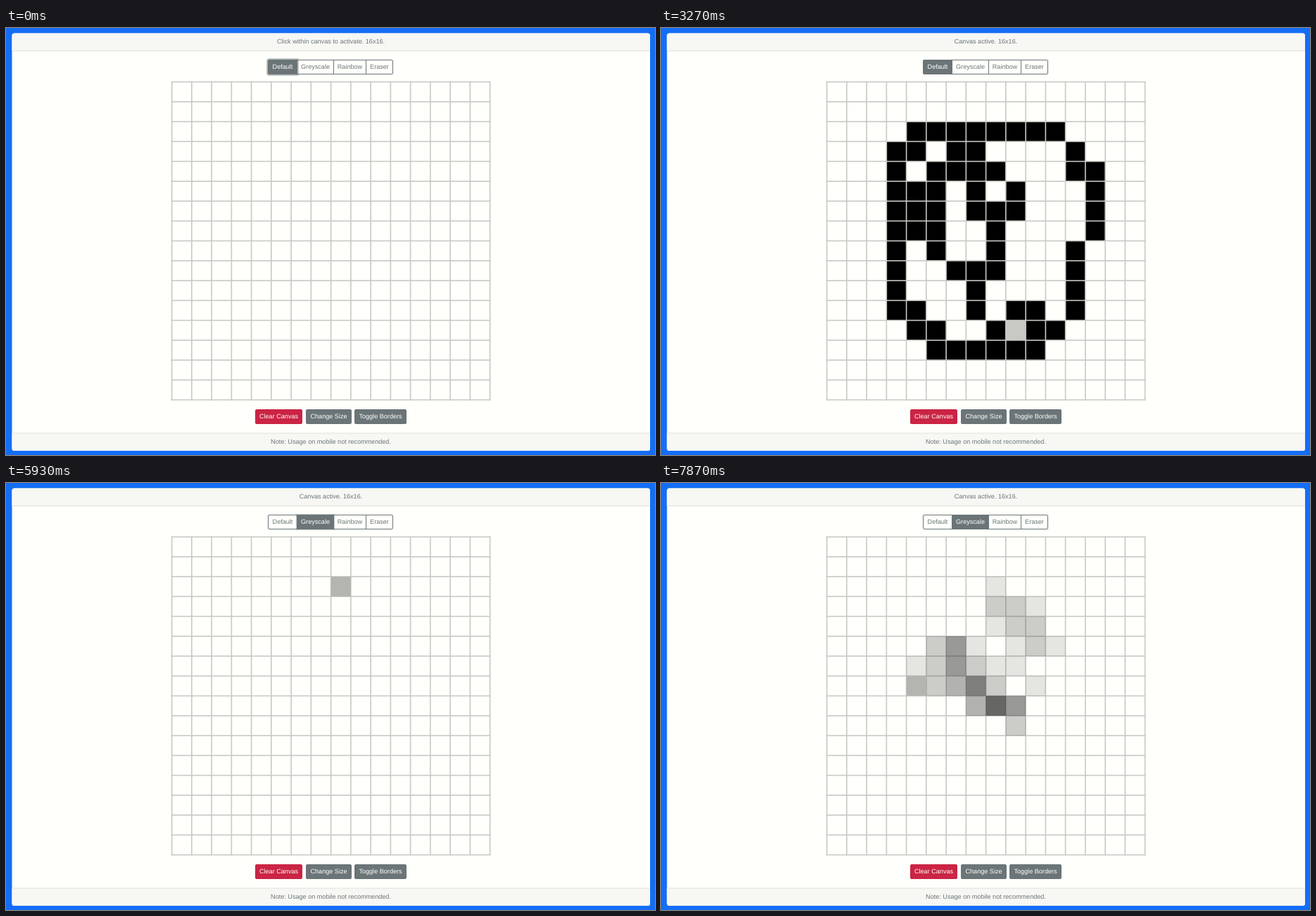
Recreate the animation shown at these times as an HTML page with a canvas. Size 922 by 607 pixels, loop 8 s.

```html
<!DOCTYPE html>
<html lang="en">
<head>
<meta charset="utf-8">
<title>Pixel sketch pad</title>
<style>
  html, body { margin: 0; width: 100%; height: 100%; overflow: hidden; background: #146ef5; }
  body { position: relative; font: 9.1px/1 "Liberation Sans", Arial, sans-serif; text-rendering: geometricPrecision; }
  canvas { position: absolute; left: 0; top: 0; }
  .bar, .btn { position: absolute; display: flex; align-items: center; justify-content: center; white-space: nowrap; }
  .bar { left: 8px; width: 907px; height: 24px; color: #6c757a; }
  .btn { box-sizing: border-box; height: 21px; border: 1px solid #6b7578; color: #fffffb; background: #6b7578; border-radius: 2px; }
  .mode { top: 45px; border-radius: 0; color: #6b7578; background: #fffffb; }
  .mode.first { border-radius: 2px 0 0 2px; }
  .mode.last { border-radius: 0 2px 2px 0; }
  .tool { top: 542px; }
</style>
</head>
<body>
<canvas id="stage" width="922" height="607"></canvas>
<div class="bar" id="status" style="top:8px"></div>
<div class="btn mode first" id="normal" style="left:372px;width:42px">Default</div>
<div class="btn mode" id="grey" style="left:413px;width:53px">Greyscale</div>
<div class="btn mode" style="left:465px;width:47px">Rainbow</div>
<div class="btn mode last" style="left:511px;width:39px">Eraser</div>
<div class="btn tool" id="clear" style="left:354px;width:67px">Clear Canvas</div>
<div class="btn tool" style="left:426px;width:65px">Change Size</div>
<div class="btn tool" style="left:495px;width:74px">Toggle Borders</div>
<div class="bar" style="top:577px">Note: Usage on mobile not recommended.</div>
<script>
const LOOP = 8000, TICK = 1000 / 15;
const N = 16, SIZE = 28.25, LEFT = 235.6, TOP = 76.6, LINE = 1.6;
const PAPER = [255, 255, 251], SLATE = [107, 117, 120], RED = [203, 36, 68], DARK_RED = [172, 27, 56];
const START = 7, WIPE = 59, RESTART = 89;

// first tick, last tick, kind, first cell, compass moves
const strokes = [
  [3, 3, 'hover', 10, 6, ''],
  [7, 18, 'black', 9, 6, 'w s3 w2 nw n4 ne e se2 s w2 n2 w'],
  [19, 32, 'black', 5, 4, 'sw s2 w s4 e s e s e5 n e ne n3 ne n3 w n nw w2'],
  [33, 35, 'black', 8, 2, 'w4 s w s'],
  [36, 41, 'black', 3, 5, 's se4 s se2 ne'],
  [44, 44, 'black', 10, 11, ''],
  [47, 47, 'black', 9, 11, ''],
  [49, 52, 'black', 9, 12, 'sw3'],
  [53, 53, 'out', 0, 0, ''],
  [62, 71, 'hover', 5, 14, 'n5 ne n3 ne n3 nw'],
  [76, 76, 'out', 0, 0, ''],
  [86, 88, 'hover', 7, 0, 'se'],
  [89, 94, 'shade', 8, 2, 's e s e s e'],
  [95, 97, 'shade', 10, 4, 'n w2 s e s e'],
  [98, 98, 'shade', 10, 7, ''],
  [100, 107, 'shade', 9, 6, 'w nw w s se2 e w nw2 n w s e se2 e w2 nw n2 se3'],
  [109, 116, 'shade', 9, 9, 'nw2 s nw w nw e n e se s e se s nw'],
  [118, 118, 'shade', 7, 8, 'nw w2']
];

function trace(x, y, moves) {
  const cells = [[x, y]];
  for (const [, dir, count] of moves.matchAll(/([nsew]+)(\d*)/g)) {
    for (let i = 0; i < (count || 1); i++) {
      x += dir.includes('e') - dir.includes('w');
      y += dir.includes('s') - dir.includes('n');
      cells.push([x, y]);
    }
  }
  return cells;
}

const visits = strokes.flatMap(([from, to, kind, x, y, moves]) => {
  const cells = trace(x, y, moves);
  return cells.map(([cx, cy], i) => ({
    tick: from + Math.ceil((to - from) * i / Math.max(1, cells.length - 1)),
    kind, x: cx, y: cy
  }));
});

const $ = id => document.getElementById(id);
const g = $('stage').getContext('2d');
const ramp = (k, a, b) => Math.min(1, Math.max(0, (k - a) / (b - a)));
const mix = (a, b, p) => `rgb(${a.map((v, i) => Math.round(v + (b[i] - v) * p))})`;

function rect(color, x, y, w, h) {
  g.fillStyle = color;
  g.fillRect(x, y, w, h);
}

function drawCard() {
  rect('#146ef5', 0, 0, 922, 607);
  g.save();
  g.beginPath();
  g.roundRect(8.5, 7.5, 906.5, 593.5, 3.5);
  g.clip();
  rect('#fffffb', 0, 0, 922, 607);
  rect('#f7f7f3', 8, 7, 907, 25);
  rect('#f7f7f3', 8, 576, 907, 26);
  rect('#dfdfdb', 8, 32, 907, 1);
  rect('#dfdfdb', 8, 575.5, 907, 1);
  g.restore();
}

function drawGrid(k) {
  const black = new Set(), shade = new Map();
  let pointer = null;
  for (const v of visits) {
    if (v.tick > k) break;
    const id = v.y * N + v.x;
    pointer = v.kind === 'out' ? null : id;
    if (v.kind === 'black' && k < WIPE) black.add(id);
    if (v.kind === 'shade') shade.set(id, (shade.get(id) || 0) + 1);
  }
  const cell = (id, color) => rect(color, LEFT + id % N * SIZE, TOP + Math.floor(id / N) * SIZE, SIZE, SIZE);
  for (const id of black) cell(id, '#000');
  if (pointer !== null) cell(pointer, '#c8c8c4');
  for (let i = 0; i <= N; i++) {
    const d = i * SIZE - LINE / 2;
    rect('#c8c8c4', LEFT + d, TOP - LINE / 2, LINE, N * SIZE + LINE);
    rect('#c8c8c4', LEFT - LINE / 2, TOP + d, N * SIZE + LINE, LINE);
  }
  for (const [id, level] of shade) cell(id, `rgba(0,0,0,${level / 10})`);
}

function ring(el, color, p) {
  el.style.boxShadow = p ? `0 0 0 ${1.8 * p}px rgba(${color},${0.5 * p})` : 'none';
  el.style.zIndex = p ? 2 : 0;
}

function modeFill(el, p) {
  el.style.background = mix(PAPER, SLATE, p);
  el.style.color = mix(SLATE, PAPER, p);
}

function drawButtons(k) {
  const active = (k >= START && k < WIPE) || k >= RESTART;
  $('status').textContent = (active ? 'Canvas active.' : 'Click within canvas to activate.') + ' 16x16.';
  modeFill($('normal'), 1 - ramp(k, 82, 84));
  modeFill($('grey'), ramp(k, 76, 79));
  ring($('normal'), SLATE, 1 - ramp(k, 6, 9));
  ring($('grey'), SLATE, ramp(k, 81, 84) - ramp(k, 88, 91));
  const red = mix(RED, DARK_RED, ramp(k, 53, 56) - ramp(k, 81, 84));
  $('clear').style.background = $('clear').style.borderColor = red;
  ring($('clear'), RED, ramp(k, 58, 60) - ramp(k, 81, 84));
}

const t0 = performance.now();
let last = -1;
function frame() {
  const t = (performance.now() - t0) % LOOP;
  const k = Math.floor((t + 4) / TICK);
  if (k !== last) {
    last = k;
    drawCard();
    drawGrid(k);
    drawButtons(k);
  }
  requestAnimationFrame(frame);
}
frame();
</script>
</body>
</html>
```
